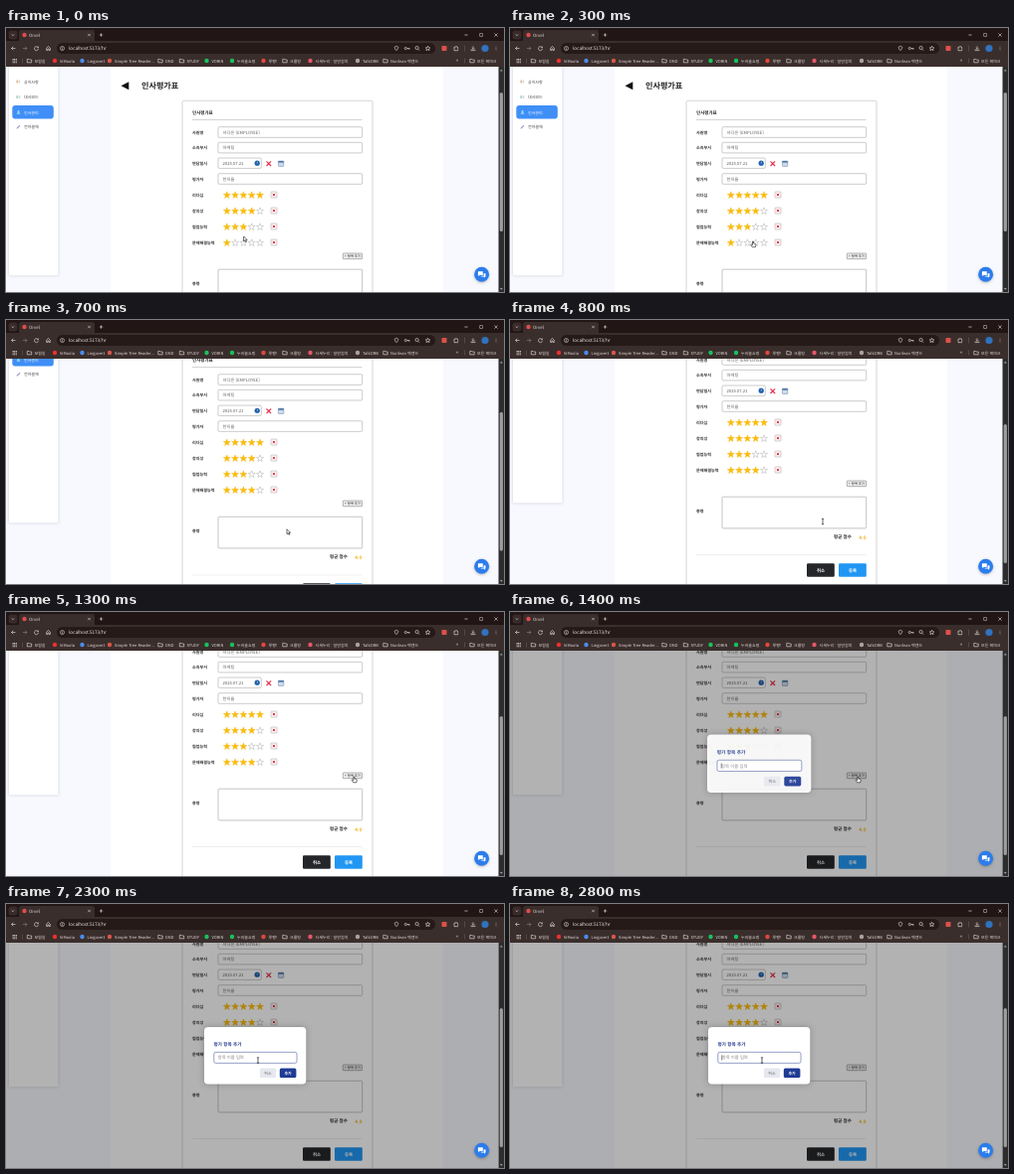
An HTML page with a canvas that plays this animation: 500 px wide and 266 px high, repeating every 3 s.

```html
<!DOCTYPE html>
<html lang="ko">
<head>
<meta charset="utf-8">
<title>HR</title>
<style>
  html, body { margin: 0; width: 100%; height: 100%; overflow: hidden; background: #fff; }
  canvas { display: block; width: 500px; height: 266px; }
</style>
</head>
<body>
<canvas id="stage"></canvas>
<script>
const W = 500, H = 266, LOOP = 3000, STEP = 100, PAGE_TOP = 39;
const FONT = '"Noto Sans CJK KR", "Noto Sans CJK JP", "Noto Sans CJK", "Noto Sans", sans-serif';
const canvas = document.getElementById('stage');
const ctx = canvas.getContext('2d');
const dpr = window.devicePixelRatio || 1;
canvas.width = W * dpr;
canvas.height = H * dpr;

// ---- drawing helpers ----
const shift = (x, y) => ctx.transform(1, 0, 0, 1, x, y);

function box(x, y, w, h, fill, { r = 0, stroke, line = 0.5 } = {}) {
  ctx.beginPath();
  ctx.roundRect(x, y, w, h, r);
  if (fill) { ctx.fillStyle = fill; ctx.fill(); }
  if (stroke) { ctx.strokeStyle = stroke; ctx.lineWidth = line; ctx.stroke(); }
}

function text(str, x, y, size, color, { bold = false, align = 'left' } = {}) {
  ctx.font = `${bold ? 700 : 400} ${size}px ${FONT}`;
  ctx.textRendering = 'geometricPrecision';
  ctx.textBaseline = 'middle';
  ctx.textAlign = align;
  ctx.fillStyle = color;
  ctx.fillText(str, x, y);
}

function dot(x, y, r, fill, stroke, line = 0.6) {
  ctx.beginPath();
  ctx.arc(x, y, r, 0, Math.PI * 2);
  if (fill) { ctx.fillStyle = fill; ctx.fill(); }
  if (stroke) { ctx.strokeStyle = stroke; ctx.lineWidth = line; ctx.stroke(); }
}

// SVG path data placed at (x, y)
function shape(d, x, y, { fill, stroke, line = 0.7 } = {}) {
  const path = new Path2D(d);
  ctx.save();
  shift(x, y);
  if (fill) { ctx.fillStyle = fill; ctx.fill(path); }
  if (stroke) { ctx.strokeStyle = stroke; ctx.lineWidth = line; ctx.stroke(path); }
  ctx.restore();
}

function star(x, y, filled) {
  ctx.beginPath();
  for (let i = 0; i < 10; i++) {
    const r = i % 2 ? 1.5 : 3.7, a = -Math.PI / 2 + i * Math.PI / 5;
    ctx.lineTo(x + r * Math.cos(a), y + 0.3 + r * Math.sin(a));
  }
  ctx.closePath();
  ctx.fillStyle = filled ? '#fbbd08' : '#fff';
  ctx.fill();
  ctx.strokeStyle = filled ? '#f3b20a' : '#999';
  ctx.lineWidth = 0.4;
  ctx.stroke();
}

const cross = (x, y, r, stroke, line) =>
  shape(`M${-r} ${-r}L${r} ${r}M${r} ${-r}L${-r} ${r}`, x, y, { stroke, line });

// ---- browser frame ----
const INK = '#e3dcda';
const BOOKMARKS = [
  ['folder', 23.5, '보람길'], ['#f03030', 49, 'ViMoola'], ['#4b8df0', 76.5, 'Lingovert'],
  ['#d8564a', 104, 'Simple Tree Reader...'], ['folder', 155, 'DND'], ['folder', 176.5, 'STUDY'],
  ['#19c15c', 201.5, 'VORIN'], ['#19c15c', 227, '누리솔쇼핑'], ['#e5473c', 258.5, '루펭!'],
  ['folder', 280, '크롤링'], ['#e8566a', 305.5, '시세누리 : 일반검색'],
  ['#a9a3a1', 353, 'TalkORB'], ['folder', 381, 'Nurilean 백엔드'], ['folder', 468, '모든 북마크']
];

function drawBrowser() {
  const icon = (d, x, y) => shape(d, x, y, { stroke: INK, line: 0.65 });
  box(0, 0, W, PAGE_TOP, '#3a2e2c');
  box(0, 0, W, 13, '#211615');
  box(2.5, 2.5, 9, 9, '#382b29', { r: 2.5 });
  icon('M-1.3-.6L0 .7L1.3-.6', 7, 7);
  box(13, 2, 76, 13, '#3a2e2c', { r: 2.5 });
  dot(18.5, 7, 2.2, '#e04b4b');
  text('Orvel', 23, 7, 4.4, INK);
  cross(83.5, 7, 1.2, INK, 0.6);
  icon('M-1.7 0H1.7M0-1.7V1.7', 95.5, 7);
  icon('M-1.6 0H1.6', 462, 7);
  box(475.6, 5.5, 3, 3, null, { r: 0.4, stroke: INK });
  cross(492, 7, 1.6, INK, 0.6);

  icon('M2 0H-2M-.2-1.8L-2 0L-.2 1.8', 7.5, 20.5);
  shape('M-2 0H2M.2-1.8L2 0L.2 1.8', 19, 20.5, { stroke: '#8b7f7c', line: 0.65 });
  icon('M1.7-.9A2 2 0 1 0 2 .4M1.9-2V-.7H.6', 30.5, 20.5);
  icon('M-1.8 2V-.4L0-2L1.8-.4V2H.6V.5H-.6V2Z', 42.5, 20.5);
  box(51, 15, 380, 11, '#251a18', { r: 5.5 });
  dot(56.5, 20.5, 2, null, INK);
  icon('M0-.3V1.1M0-1.1V-.7', 56.5, 20.5);
  text('localhost:5173/hr', 63, 20.4, 4.6, '#efe9e7');
  icon('M0 2.2C-3-1-1.6-2.2 0-2.2S3-1 0 2.2ZM-.2-.6H.2', 392, 20.5);
  icon('M-2.3 0a1.1 1.1 0 1 0 2.2 0a1.1 1.1 0 1 0-2.2 0M0 0H2.6V1.2M1.5 0V1', 402.5, 20.5);
  icon('M-2-.5a1.6 1.6 0 1 0 3.2 0a1.6 1.6 0 1 0-3.2 0M.8.8L2.2 2.2', 413, 20.5);
  icon('M0-2.3L.7-.7L2.3-.6L1.1.5L1.5 2.1L0 1.2L-1.5 2.1L-1.1.5L-2.3-.6L-.7-.7Z', 423.5, 20.5);
  box(437.5, 18, 5, 5, '#e0504a', { r: 0.8 });
  icon('M-2-1.3H-.7A.7.7 0 0 1 .7-1.3H1.6V0A.7.7 0 0 1 1.6 1.2V2.2H-2Z', 452, 20.5);
  box(460.4, 17.5, 0.5, 6, '#6d5f5c');
  icon('M0-2.2V.8M-1.3-.4L0 .9L1.3-.4M-2 1V2.1H2V1', 469, 20.5);
  dot(481, 20.5, 3.6, '#2f72bd');
  for (const dy of [-1.6, 0, 1.6]) dot(492, 20.5 + dy, 0.45, INK);

  for (let i = 0; i < 9; i++)
    box(6.6 + i % 3 * 1.6, 31 + Math.floor(i / 3) * 1.6, 1, 1, INK);
  box(16, 30.5, 0.5, 5, '#6d5f5c');
  for (const [kind, x, name] of BOOKMARKS) {
    if (kind === 'folder') icon('M-2.2-1.6H-.5L.1-1H2.2V1.8H-2.2Z', x, 33);
    else dot(x, 33, 2.2, kind);
    text(name, x + 5, 33, 4, INK);
  }
  text('»', 453, 32.5, 5, INK, { align: 'center' });
  box(460.4, 30.5, 0.5, 5, '#6d5f5c');
}

function drawScrollbar(scroll) {
  box(494.5, PAGE_TOP, 5.5, H - PAGE_TOP, '#2c2c2c');
  box(495.7, 65 + scroll * 40 / 65, 3.2, 140, '#9f9f9f', { r: 1.6 });
  shape('M-1.4 1L0-1L1.4 1Z', 497.3, 42.5, { fill: '#9f9f9f' });
  shape('M-1.4-1L0 1L1.4-1Z', 497.3, 263, { fill: '#9f9f9f' });
}

// ---- page content (coordinates at scroll 0) ----
const MENU = [['공지사항', 54, '#f0a35c'], ['대시보드', 69.5, '#8fc9b0'],
              ['인사관리', 85, '#9fe0ff'], ['전자결재', 99.7, '#a58fd0']];

function drawSidebar() {
  ctx.save();
  ctx.shadowColor = 'rgba(60,70,110,.3)';
  ctx.shadowBlur = 2.5 * dpr;
  box(3, 20, 49.5, 229.5, '#fff', { r: 1 });
  ctx.restore();
  box(6.3, 78, 41.5, 13.4, '#3f8ff7', { r: 3 });
  for (const [name, y, color] of MENU) {
    const active = name === '인사관리';
    if (name === '전자결재') shape('M-1.7 1.7L1.5-1.5', 12.5, y, { stroke: color, line: 1.1 });
    else if (active) { dot(12.5, y - 1, 1, color); box(10.8, y + 0.3, 3.4, 1.5, color, { r: 0.7 }); }
    else { box(10.5, y - 1.5, 1.2, 3, color); box(12.4, y - 1.5, 2, 3, '#d9dde6'); }
    text(name, 18, y, 4, active ? '#fff' : '#444');
  }
}

function field(label, y, value) {
  text(label, 187, y, 4.1, '#333', { bold: true });
  box(213, y - 5.3, 144.7, 10.6, '#fff', { r: 1.2, stroke: '#999' });
  text(value, 217.5, y, 4.3, '#666');
}

function ratingRow(label, y, score) {
  text(label, 187, y, 4.1, '#333', { bold: true });
  for (let i = 0; i < 5; i++) star(221.8 + i * 8.3, y, i < score);
  box(266, y - 3.2, 6, 6, '#fff5f5', { r: 0.6, stroke: '#a89a9a' });
  cross(269, y - 0.2, 1.1, '#d9263c', 0.9);
}

function drawForm(scores) {
  shape('M4-4V4L-3.8 0Z', 119.3, 58.2, { fill: '#111' });
  text('인사평가표', 136, 58.2, 8.1, '#222', { bold: true });
  box(177, 73.3, 191, 300, '#fff', { r: 1.5, stroke: '#aaa' });
  text('인사평가표', 187, 85.3, 4.5, '#222', { bold: true });
  box(187, 92, 170.5, 0.5, '#aaa');

  field('사원명', 105, '서다온 (EMPLOYEE)');
  field('소속부서', 120.6, '마케팅');
  text('면담일시', 187, 136.3, 4.1, '#333', { bold: true });
  box(213, 131, 43.3, 10.4, '#fff', { r: 1.2, stroke: '#999' });
  text('2025.07.21', 217.5, 136.2, 4.2, '#555');
  dot(252.2, 136.2, 2.6, '#1d5fae');
  box(251.9, 134.8, 0.6, 1.7, '#fff');
  cross(263.8, 136.7, 2.3, '#e2304a', 1.2);
  box(273.4, 134, 5.4, 5.4, '#cfdcec', { r: 0.6, stroke: '#5f7d9c' });
  box(273.4, 134, 5.4, 1.7, '#4f79a8');
  field('평가자', 152, '한지율');

  ['리더십', '창의성', '협업능력', '문제해결능력'].forEach((label, i) =>
    ratingRow(label, 168.2 + i * 16, scores[i]));

  box(338.3, 227, 19.2, 5.7, '#efefef', { r: 0.5, stroke: '#666' });
  text('+ 항목 추가', 348, 229.8, 3.3, '#111', { align: 'center' });
  text('총평', 187, 257.3, 4.1, '#333', { bold: true });
  box(213, 243.2, 144.7, 31.7, '#fff', { r: 1.2, stroke: '#888' });
  const average = scores.reduce((a, b) => a + b) / scores.length;
  text('평균 점수', 325, 283.6, 4.5, '#222', { bold: true });
  text(average.toFixed(1), 357.5, 283.8, 4.8, '#f5b01c', { bold: true, align: 'right' });
  box(187, 301.6, 170.5, 0.5, '#ddd');
  box(298, 310.3, 27.8, 13.4, '#24262a', { r: 1.2 });
  text('취소', 312, 317, 4.4, '#fff', { bold: true, align: 'center' });
  box(330, 310.3, 27.8, 13.4, '#2196f3', { r: 1.2 });
  text('등록', 344, 317, 4.4, '#fff', { bold: true, align: 'center' });
}

function drawChatButton() {
  ctx.save();
  ctx.shadowColor = 'rgba(0,0,0,.25)';
  ctx.shadowBlur = 3 * dpr;
  ctx.shadowOffsetY = dpr;
  dot(477.6, 248.3, 7.5, '#2b7cec');
  ctx.restore();
  shape('M-3.7-2.8H1.2V1H-1.8L-3.2 2.2V1H-3.7Z', 477.6, 248, { fill: '#fff' });
  shape('M2-.8H3.9V2.6H3.4V3.7L2 2.6H-.8V1.8H2Z', 477.6, 248, { fill: '#fff' });
}

function drawModal(scale, opacity, caret) {
  ctx.save();
  shift(250, 152.7);
  ctx.scale(scale, scale);
  shift(-250, -152.7);
  ctx.globalAlpha = opacity;
  ctx.shadowColor = 'rgba(0,0,0,.25)';
  ctx.shadowBlur = 6 * dpr;
  box(199, 124, 102.3, 57.5, '#fff', { r: 4 });
  ctx.shadowColor = 'transparent';
  text('평가 항목 추가', 208.6, 141.7, 4.6, '#213a8f', { bold: true });
  box(208.8, 149.3, 83.2, 11, '#fff', { r: 1.8, stroke: '#4a5d9c', line: 0.6 });
  text('항목 이름 입력', 212.7, 154.8, 4.3, '#858585');
  if (caret) box(212.6, 152.2, 0.5, 5.2, '#111');
  box(254.8, 165.5, 16.4, 9.5, '#e6e8ef', { r: 1.6 });
  text('취소', 263, 170.2, 4, '#666', { align: 'center' });
  box(274.8, 165.5, 16.6, 9.5, '#1e3a94', { r: 1.6 });
  text('추가', 283.1, 170.2, 4, '#fff', { bold: true, align: 'center' });
  ctx.restore();
}

// ---- pointer ----
const POINTERS = {
  arrow: 'M0 0V5L1.2 3.9L2 5.7L2.8 5.3L2 3.6H3.6Z',
  hand: 'M-.5 0Q0-.5.5 0V2L2.5 2.5Q3 2.7 2.9 3.4L2.4 5.8H-.7L-2.2 3.5Q-2.2 2.7-1.5 2.9L-.5 3.7Z',
  beam: 'M-1.1-2.7H1.1M0-2.7V2.7M-1.1 2.7H1.1'
};
const POINTER_PATH = [[0, 238.6, 210], [300, 244, 215], [600, 250, 218.5], [800, 314, 203],
                      [1200, 349.5, 166], [1400, 349.3, 166], [1800, 253, 157.5], [LOOP, 253, 157.5]];
const POINTER_KIND = [[0, 'arrow'], [100, 'hand'], [700, 'arrow'], [800, 'beam'], [1100, 'arrow'],
                      [1200, 'hand'], [1500, 'arrow'], [1700, 'beam']];

function pointerAt(t) {
  const i = POINTER_PATH.findIndex(([time]) => time > t);
  const [t0, x0, y0] = POINTER_PATH[i - 1], [t1, x1, y1] = POINTER_PATH[i];
  const p = (t - t0) / (t1 - t0);
  return [x0 + (x1 - x0) * p, y0 + (y1 - y0) * p];
}

function drawPointer(t) {
  const kind = POINTER_KIND.filter(([time]) => time <= t).pop()[1];
  const style = kind === 'beam' ? { stroke: '#222', line: 0.7 }
                                : { fill: '#fff', stroke: '#111', line: 0.6 };
  shape(POINTERS[kind], ...pointerAt(t), style);
}

// ---- timeline ----
const clamp = v => Math.max(0, Math.min(1, v));
const easeOut = p => 1 - (1 - p) ** 2;

function draw(t) {
  const scroll = 65 * easeOut(clamp((t - 620) / 180));
  const modalOpen = t >= 1400;
  const settle = clamp((t - 1400) / 100);
  ctx.setTransform(dpr, 0, 0, dpr, 0, 0);
  box(0, 0, W, H, '#f7f9fe');
  box(105, PAGE_TOP, 334, H - PAGE_TOP, '#fff');

  ctx.save();
  shift(0, -scroll);
  drawSidebar();
  drawForm([5, 4, 3, t < 400 ? 1 : 4]);
  ctx.restore();

  if (modalOpen) {
    box(0, PAGE_TOP, 494.5, H - PAGE_TOP, 'rgba(0,0,0,.3)');
    drawModal(1.02 - 0.02 * settle, 0.93 + 0.07 * settle, t < 1900 || t >= 2500);
  }
  drawChatButton();
  drawScrollbar(scroll);
  drawBrowser();
  drawPointer(t);
}

// The screen advances in tenths of a second.
function tick() {
  const t = performance.now() % LOOP;
  draw(Math.floor(t / STEP) * STEP);
  requestAnimationFrame(tick);
}
tick();
</script>
</body>
</html>
```
